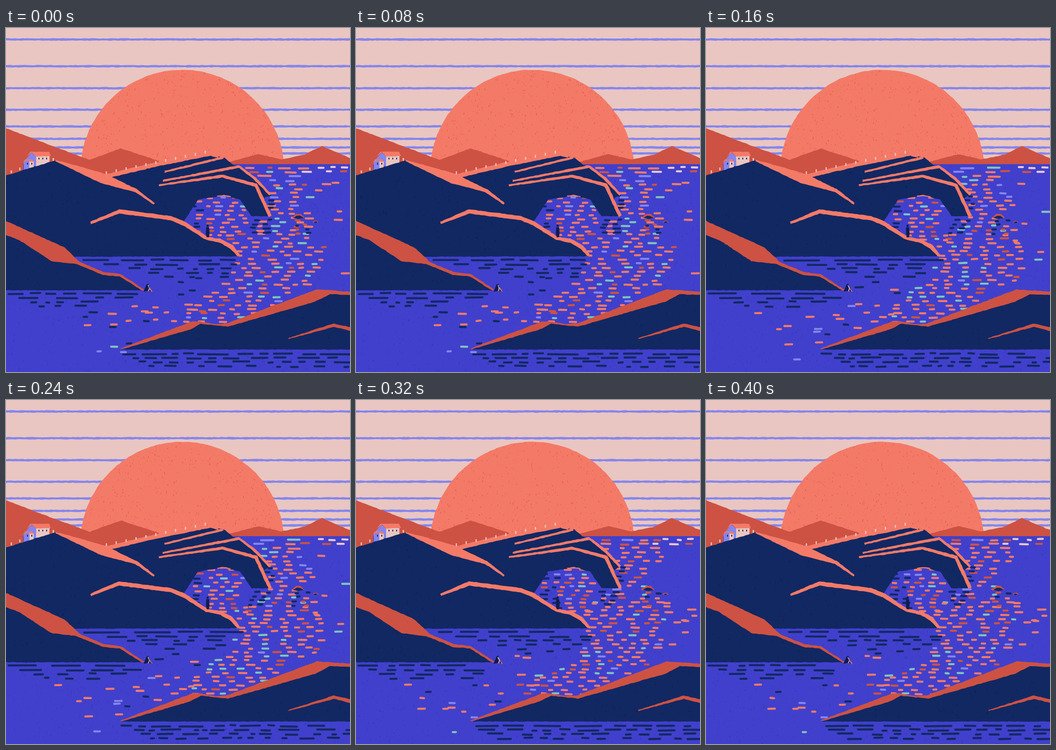
Write an HTML page with a canvas that moves like this. It is 720 by 720 pixels and loops after 0.48 s.

```html
<!DOCTYPE html>
<html lang="en">
<head>
<meta charset="utf-8">
<title>Sunset bay</title>
<style>
  html, body { margin: 0; width: 100%; height: 100%; overflow: hidden; background: #4140cc; }
  canvas { display: block; width: 100vw; height: 100vh; }
</style>
</head>
<body>
<canvas id="stage" width="720" height="720"></canvas>
<script>
const SIZE = 720, STEP = 80, FRAMES = 6, ROW = 8.7;
const C = {
  sky: '#e9c6c1', line: '#8485ee', coral: '#f47a68', rust: '#cd5243', sea: '#4140cc',
  navy: '#122862', teal: '#7fc4bd', violet: '#8485ee', pink: '#e9c6d4',
  seaGrain: '#372fb0', sunGrain: '#e9503f', navyGrain: '#0d1b48', ink: '#101d4c'
};

let g, rand;
function seed(n) {
  let a = n * 7919 + 17;
  rand = () => {
    a = (a + 0x6D2B79F5) | 0;
    let t = Math.imul(a ^ (a >>> 15), 1 | a);
    t = (t + Math.imul(t ^ (t >>> 7), 61 | t)) ^ t;
    return ((t ^ (t >>> 14)) >>> 0) / 4294967296;
  };
}
const between = (a, b) => a + (b - a) * rand();
const jitter = k => between(-k, k);
const lerp = (a, b, t) => a + (b - a) * t;
const clamp = t => Math.max(0, Math.min(1, t));

// Hand-cut outline: every edge is split and nudged a little.
function roughPath(pts, k = 0.5) {
  const path = new Path2D();
  pts.forEach(([x, y], i) => {
    const [u, v] = pts[(i + 1) % pts.length];
    const n = Math.max(1, Math.round(Math.hypot(u - x, v - y) / 5));
    for (let j = 0; j < n; j++) {
      path.lineTo(lerp(x, u, j / n) + jitter(k), lerp(y, v, j / n) + jitter(k));
    }
  });
  path.closePath();
  return path;
}

function shape(pts, color, k) {
  const path = roughPath(pts, k);
  g.fillStyle = color;
  g.fill(path);
  return path;
}

function grain(path, color, count, [x, y, w, h], alpha = 0.5) {
  g.save();
  g.clip(path);
  g.globalAlpha = alpha;
  g.fillStyle = color;
  for (let i = 0; i < count; i++) {
    const s = between(0.7, 1.8);
    g.fillRect(x + rand() * w, y + rand() * h, s, s * between(1, 2.6));
  }
  g.restore();
}

// Points are [x, y, width].
function ribbon(pts, color) {
  const left = [], right = [];
  pts.forEach(([x, y, w], i) => {
    const a = pts[Math.max(0, i - 1)], b = pts[Math.min(pts.length - 1, i + 1)];
    const d = Math.hypot(b[0] - a[0], b[1] - a[1]);
    const nx = -(b[1] - a[1]) / d * w / 2, ny = (b[0] - a[0]) / d * w / 2;
    left.push([x + nx, y + ny]);
    right.unshift([x - nx, y - ny]);
  });
  shape(left.concat(right), color);
}

function dash(x, y, len, color) {
  g.strokeStyle = color;
  g.lineWidth = 4.3;
  g.lineCap = 'round';
  g.beginPath();
  g.moveTo(x + 2, y + jitter(0.4));
  g.lineTo(x + len - 2, y + jitter(0.4));
  g.stroke();
}

function dashRow(y, x0, x1, density, min, max, pick) {
  let x = x0 + rand() * 14;
  while (x < x1) {
    const len = between(min, max);
    if (x + len > x1 + 8) break;
    dash(x, y + jitter(1.4), len, pick(x));
    x += len + 4 + len * (1 / density - 1) * between(0.3, 1.7);
  }
}

function scatter(count, x, y, w, h, pick) {
  for (let i = 0; i < count; i++) dash(x + rand() * w, y + rand() * h, between(10, 20), pick());
}

// Rows of shadow that thin out and shorten away from the shore.
function shore(y, x0, x1, rows, shift, pull, fade) {
  for (let i = 0; i < rows; i++) {
    dashRow(y + i * ROW, x0 + i * shift, x1 - i * pull, 0.8 - i * fade, 10, 18 + 60 / (i + 1), dark);
  }
}

const dark = () => C.navy;
const mostly = (main, other, p) => () => rand() < p ? main : other;
function glint() {
  const r = rand();
  return r < 0.72 ? C.coral : r < 0.84 ? C.rust : r < 0.95 ? C.teal : C.violet;
}

// The sun's reflection: narrow behind the rock, wide in the bay, drifting left near the viewer.
function glow(y) {
  const sway = y < 440 ? 22 * Math.sin((y - 290) / 150 * Math.PI) : 0;
  const mid = 568 + sway - 1.5 * Math.max(0, y - 520);
  const half = 66 - 28 * clamp((y - 290) / 50) + 46 * clamp((y - 395) / 40);
  return [mid - half, mid + half];
}

function water(pose) {
  seed(40 + pose);
  for (let y = 293; y < 615; y += ROW) {
    const [l, r] = glow(y);
    dashRow(y, l + jitter(18), r + jitter(18), 0.47, 10, y < 312 ? 30 : 20, glint);
  }
  for (let y = 356; y < 446; y += ROW) {
    dashRow(y, 384, 500, 0.55, 9, 18, x => x < 418 && rand() < 0.7 ? C.navy : glint());
  }
  // Shadows below the pillar and the islets.
  for (let i = 0; i < 4; i++) {
    dashRow(402 + i * ROW, 506, 552, 0.65, 8, 18, dark);
    dashRow(351 + i * ROW, 540, 566, 0.6, 9, 14, dark);
    dashRow(404 + i * ROW, 596, 634, 0.5, 8, 14, mostly(C.navy, C.rust, 0.5));
  }
  dashRow(292, 640, 720, 0.5, 10, 18, mostly(C.pink, C.rust, 0.7));
  dashRow(301, 612, 720, 0.5, 12, 24, mostly(C.pink, C.rust, 0.5));

  shore(486, 160, 492, 5, 42, 2, 0.13);
  shore(556, 0, 292, 4, 22, 14, 0.17);
  shore(682, 236, 728, 4, 18, 0, 0.1);

  scatter(8, 640, 320, 65, 210, glint);
  scatter(10, 60, 595, 260, 70, mostly(C.coral, C.navy, 0.6));
  scatter(8, 260, 570, 150, 45, glint);
  scatter(3, 180, 625, 100, 80, mostly(C.violet, C.teal, 0.7));
  scatter(4, 310, 520, 90, 40, mostly(C.navy, C.coral, 0.7));
}

function sky(pose) {
  g.fillStyle = C.sky;
  g.fillRect(0, 0, SIZE, 290);
  for (const y of [24, 80, 126, 171, 206, 232, 250, 262.5]) {
    ribbon([[-5, y, 4.6], [725, y, 4.6]], C.line);
  }
  const sun = [];
  for (let i = 0; i < 180; i++) {
    const a = i / 90 * Math.PI;
    sun.push([369 + 213.5 * Math.cos(a), 301 + 213.5 * Math.sin(a)]);
  }
  const path = shape(sun, C.coral);
  seed(70 + pose);
  grain(path, C.sunGrain, 650, [156, 88, 426, 200], 0.65);
}

function farHills() {
  shape([[-4, 208], [100, 248], [175, 276], [240, 252], [320, 278], [330, 320], [-4, 320]], C.rust);
  shape([[465, 281], [528, 264], [576, 275], [625, 265], [661, 247], [724, 274], [724, 286], [465, 286]], C.rust);
}

function sea() {
  const path = new Path2D();
  path.rect(0, 285, SIZE, SIZE - 285);
  g.fillStyle = C.sea;
  g.fill(path);
  grain(path, C.seaGrain, 1900, [0, 285, SIZE, SIZE - 285], 0.5);
}

function islet(x, y, s) {
  shape([[x - 12 * s, y], [x - 5 * s, y - 6 * s], [x + 4 * s, y - 6 * s], [x + 12 * s, y], [x, y + 3 * s]], C.navy, 0.3);
  ribbon([[x - 12 * s, y, 2], [x - 4 * s, y - 6 * s, 4 * s], [x + 4 * s, y - 6 * s, 4 * s], [x + 12 * s, y, 2]], C.rust);
}

function houses() {
  shape([[42, 274], [53, 261], [64, 270], [64, 289], [42, 289]], C.violet, 0.3);
  shape([[63, 267], [91, 267], [91, 284], [63, 290]], C.sky, 0.3);
  shape([[51, 259], [90, 259], [94, 268], [63, 269], [54, 260], [44, 269]], C.coral, 0.3);
  shape([[37, 279], [50, 279], [50, 297], [37, 299]], C.violet, 0.3);
  shape([[49, 279], [58, 279], [58, 293], [49, 297]], C.sky, 0.3);
  shape([[40, 275], [55, 275], [59, 280], [51, 280], [47, 277], [36, 280]], C.coral, 0.3);
  g.fillStyle = C.navy;
  for (const x of [68, 76, 84]) g.fillRect(x, 271.5, 2, 3.5);
  for (const x of [44, 53]) g.fillRect(x, 282, 2, 4);
}

function headland() {
  shape([[-4, 285], [36, 285], [36, 300], [-4, 312]], C.rust, 0.2);
  shape([[90, 278], [175, 276], [320, 278], [316, 288], [210, 312], [100, 286]], C.rust, 0.3);
  shape([[103, 276], [155, 290], [210, 306], [313, 281], [430, 265], [444, 270], [425, 290], [270, 350], [120, 300]], C.coral);
  const rock = shape([[-4, 310], [103, 277], [200, 325], [270, 343], [308, 369], [310, 367],
    [275, 338], [222, 312], [320, 289], [430, 267], [457, 271], [476, 287], [490, 291], [520, 314],
    [552, 349], [540, 356], [553, 394], [514, 394], [490, 359], [455, 351], [402, 359], [372, 405],
    [420, 440], [470, 456], [487, 478], [-4, 479]], C.navy);
  grain(rock, C.navyGrain, 420, [0, 265, 555, 215]);
  ribbon([[104, 278, 2], [200, 318, 13], [272, 340, 7], [310, 368, 4]], C.coral);
  ribbon([[332, 301, 4], [455, 271, 5]], C.coral);
  ribbon([[328, 320, 4], [488, 290, 6], [521, 315, 6], [553, 349, 5]], C.coral);
  ribbon([[320, 329, 4], [453, 310, 6], [523, 329, 8], [553, 394, 7]], C.coral);
  ribbon([[429, 267, 2], [444, 270, 3]], C.coral);
  ribbon([[442, 352, 2], [456, 351, 3], [470, 353, 2]], C.coral);
  ribbon([[177, 408, 5], [237, 384, 9], [345, 398, 9], [372, 409, 9], [420, 440, 7], [450, 446, 8], [472, 458, 9], [487, 476, 6]], C.coral);
}

function posts(x0, y0, x1, y1, count) {
  g.fillStyle = C.sky;
  for (let i = 0; i < count; i++) {
    const t = i / (count - 1);
    g.fillRect(lerp(x0, x1, t) - 1.2, lerp(y0, y1, t) - 3, 2.5, 6);
  }
}

function nearLand() {
  const left = shape([[-4, 430], [28, 443], [96, 487], [150, 493], [205, 516], [240, 518], [289, 549], [-4, 549]], C.navy);
  grain(left, C.navyGrain, 120, [0, 430, 290, 120]);
  shape([[-4, 402], [122, 459], [155, 490], [205, 511], [240, 515], [290, 548], [286, 550],
    [238, 520], [203, 517], [147, 494], [95, 488], [28, 444], [-4, 432]], C.rust);

  const right = shape([[242, 673], [385, 630], [408, 618], [465, 624], [647, 571], [677, 556], [724, 558], [724, 673]], C.navy);
  grain(right, C.navyGrain, 190, [240, 555, 480, 120]);
  shape([[239, 671], [390, 614], [405, 614], [440, 620], [463, 618], [650, 547], [724, 552], [724, 559],
    [678, 557], [647, 573], [465, 625], [408, 619], [385, 631], [243, 672]], C.rust);
  ribbon([[591, 650, 2], [686, 622, 7], [724, 631, 8]], C.rust);
}

function people() {
  g.fillStyle = C.ink;
  g.beginPath();
  g.arc(422, 414, 2.4, 0, 7);
  g.fill();
  shape([[419, 417], [425, 417], [426, 430], [425, 438], [420, 438], [418.5, 430]], C.ink, 0.2);

  shape([[288, 552], [294, 537], [298, 535], [301, 544], [306, 552], [299, 550]], C.ink, 0.2);
  ribbon([[297, 538, 1.5], [300, 545, 1.8], [298, 551, 1.8]], C.pink);
  ribbon([[300, 544, 1.5], [306, 552, 1.8]], C.coral);
}

// Glints change every second frame; outlines tremble on each one.
function paint(frame) {
  const layer = document.createElement('canvas');
  layer.width = layer.height = SIZE;
  g = layer.getContext('2d');
  const pose = frame >> 1;
  seed(frame + 1);
  sky(pose);
  farHills();
  seed(100 + pose);
  sea();
  water(pose);
  seed(frame + 20);
  islet(612, 397, 1);
  islet(648, 407, 0.45);
  houses();
  headland();
  posts(11, 301, 29, 295, 2);
  posts(99, 275, 99, 275, 2);
  posts(210, 303, 417, 260, 11);
  nearLand();
  people();
  return layer;
}

const layers = Array.from({ length: FRAMES }, (_, i) => paint(i));
const view = document.getElementById('stage').getContext('2d');
const start = performance.now();
let shown = -1;
function tick() {
  const i = Math.floor((performance.now() - start) / STEP) % FRAMES;
  if (i !== shown) view.drawImage(layers[shown = i], 0, 0);
  requestAnimationFrame(tick);
}
tick();
</script>
</body>
</html>
```
